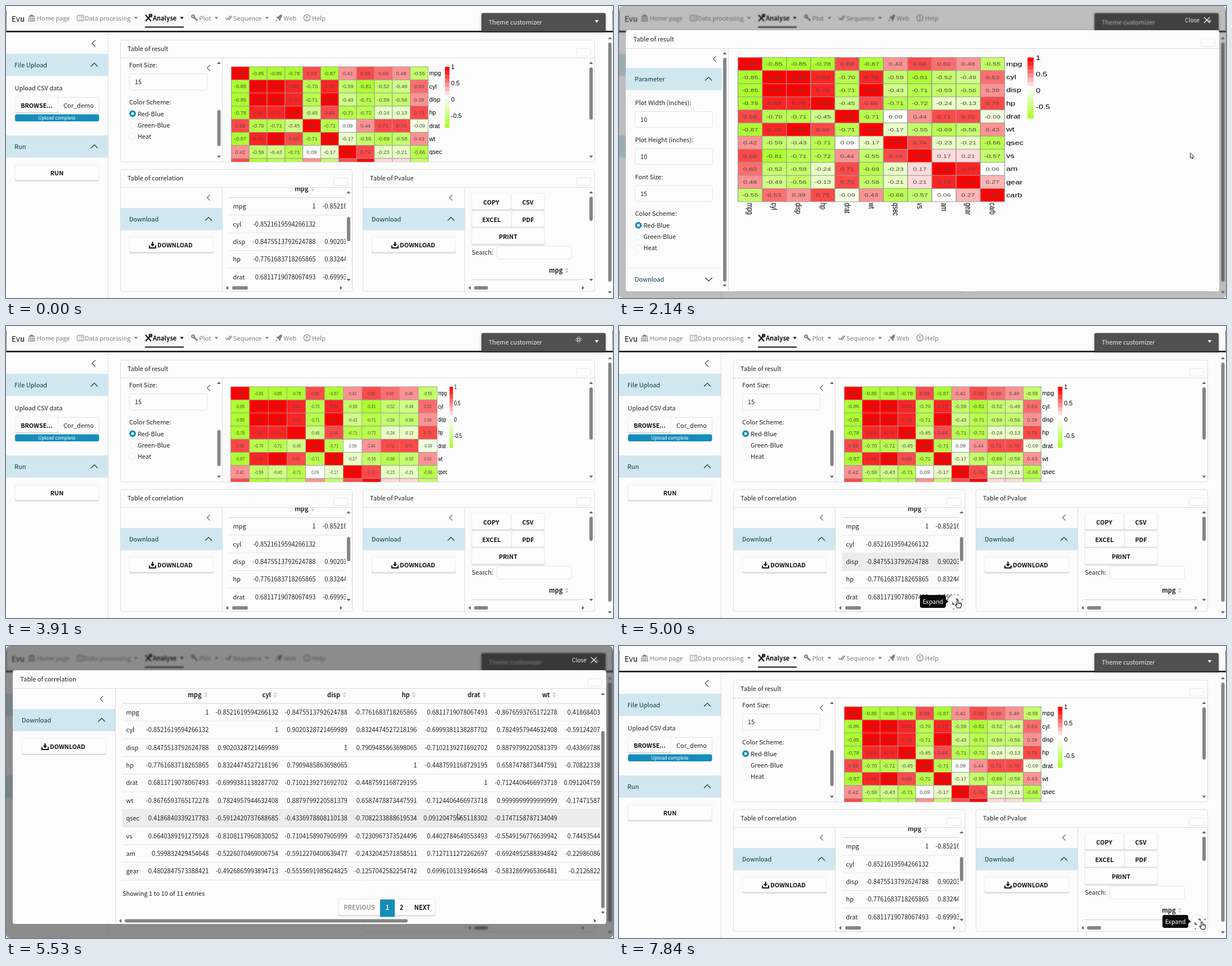
These frames come from a looping animation (1079x519 px, 7.99 s). An HTML page with a canvas:

```html
<!DOCTYPE html>
<html lang="en">
<head>
<meta charset="utf-8">
<title>Correlation dashboard</title>
<style>
html, body { margin: 0; width: 100%; height: 100%; overflow: hidden; background: #fff; }
canvas { display: block; width: 1079px; height: 519px; }
</style>
</head>
<body>
<canvas id="stage" width="1079" height="519"></canvas>
<script>
const W = 1079, H = 519, LOOP = 7990;
const canvas = document.getElementById('stage'), c = canvas.getContext('2d');
const snapshot = new OffscreenCanvas(W, H), snap = snapshot.getContext('2d');
const SANS = '"Noto Sans CJK SC", "Noto Sans CJK JP", "Noto Sans", sans-serif';
const PLOT = '"Liberation Sans", Arial, sans-serif';
const PAPER = '#fcfcfc', INK = '#222', BLUE = '#158cba', PALE = '#d0e7ef', NAVY = '#08384a', EDGE = '#dcdcdc', GREY = '#858585';

// Lower triangle of the correlation matrix, without the diagonal.
const NAMES = 'mpg cyl disp hp drat wt qsec vs am gear carb'.split(' ');
const LOWER = `
-0.8521619594266132
-0.8475513792624788 0.9020328721469989
-0.7761683718265865 0.8324474527218196 0.7909485863698065
0.6811719078067493 -0.6999381138287702 -0.7102139271692702 -0.4487591168729195
-0.8676593765172278 0.7824957944632408 0.8879799220581379 0.6587478873447591 -0.7124406466973718
0.4186840339217783 -0.5912420737688685 -0.4336978808110138 -0.7082233888619534 0.09120475965118302 -0.1747158787134049
0.6640389191275928 -0.8108117960830052 -0.7104158907905999 -0.7230967373524496 0.4402784649553493 -0.5549156776639942 0.7445354435125272
0.599832429454648 -0.5226070469006754 -0.5912270400639477 -0.2432042571858511 0.7127111272262697 -0.6924952588394842 -0.2298608621848839 0.17
0.4802847573388421 -0.4926865993894713 -0.5555691985624825 -0.1257042582254742 0.6996101319346648 -0.5832869965366481 -0.212682229720365 0.21 0.79
-0.55 0.53 0.39 0.75 -0.09 0.43 -0.66 -0.57 0.06 0.27`.split('\n').map(row => row.split(' '));
const value = (i, j) => i === j ? (i === 5 ? '0.9999999999999999' : '1') : LOWER[Math.max(i, j)][Math.min(i, j)];

function text(s, x, y, { size = 11, color = INK, bold = false, align = 'left', family = SANS } = {}) {
  c.font = `${bold ? 'bold ' : ''}${size}px ${family}`;
  c.fillStyle = color;
  c.textAlign = align;
  c.fillText(s, x, y);
}
function box(x, y, w, h, r, fill, stroke) {
  c.beginPath();
  c.roundRect(x, y, w, h, r);
  if (fill) { c.fillStyle = fill; c.fill(); }
  if (stroke) { c.strokeStyle = stroke; c.lineWidth = 1; c.stroke(); }
}
function path(points, { stroke, fill, width = 1.2, x = 0, y = 0, close = !!fill } = {}) {
  c.beginPath();
  for (let i = 0; i < points.length; i += 2) c.lineTo(x + points[i], y + points[i + 1]);
  if (close) c.closePath();
  if (fill) { c.fillStyle = fill; c.fill(); }
  if (stroke) { c.strokeStyle = stroke; c.lineWidth = width; c.stroke(); }
}
function dot(x, y, r, fill, stroke, width = 1) {
  c.beginPath();
  c.arc(x, y, r, 0, 7);
  if (fill) { c.fillStyle = fill; c.fill(); }
  if (stroke) { c.strokeStyle = stroke; c.lineWidth = width; c.stroke(); }
}
function clipped(x, y, w, h, draw) {
  c.save();
  c.beginPath();
  c.rect(x, y, w, h);
  c.clip();
  draw();
  c.restore();
}
const rule = (x1, y1, x2, y2, stroke = EDGE, width = 1) => path([x1, y1, x2, y2], { stroke, width });
const DIRECTIONS = { up: 0, right: 1, down: 2, left: 3 };
function turned(x, y, dir, draw) {
  c.save();
  c.translate(x, y);
  c.rotate(DIRECTIONS[dir] * Math.PI / 2);
  draw();
  c.restore();
}
const triangle = (x, y, dir, fill = '#666', s = 3.5) =>
  turned(x, y, dir, () => path([-s, s * .6, 0, -s * .6, s, s * .6], { fill }));
const chevron = (x, y, dir, stroke = NAVY, s = 6) =>
  turned(x, y, dir, () => path([-s, s / 2, 0, -s / 2, s, s / 2], { stroke }));

function scrollV(x, top, bottom, from, to) {
  triangle(x, top, 'up');
  triangle(x, bottom, 'down');
  box(x - 3, from, 6, to - from, 3, GREY);
}
function scrollH(y, left, right, from, to) {
  triangle(left, y, 'left');
  triangle(right, y, 'right');
  box(from, y - 3, to - from, 6, 3, GREY);
}
function button(label, x, y, w, h = 30, opts = {}) {
  box(x, y, w, h, 3, '#dadada');
  box(x + .5, y, w - 1, h - 2.5, 3, '#fdfdfd', '#efefef');
  text(label, x + w / 2, y + h / 2 + 4, { size: 10.8, bold: true, color: '#111', align: 'center', ...opts });
}
function field(label, x, y, w = 138, h = 29) {
  box(x + .5, y + .5, w, h, 4, '#fefefe', '#d9e6ec');
  text(label, x + 10, y + 19);
}
function accordion(label, x, y, w, pad = 15) {
  box(x, y, w, 39.5, 0, PALE);
  text(label, x + pad, y + 24, { color: NAVY });
  chevron(x + w - 24, y + 19.5, 'up');
}
function radios(x, y) {
  ['Red-Blue', 'Green-Blue', 'Heat'].forEach((label, i) => {
    const cy = y + i * 20.2;
    dot(x, cy, 5.5, i ? '#fefefe' : BLUE, i ? '#e6eef2' : BLUE);
    if (!i) dot(x, cy, 2.5, '#fff');
    text(label, x + 9, cy + 4.2);
  });
}
function downloadButton(x, y) {
  button('DOWNLOAD', x, y, 150, 30, { align: 'left' , color: 'transparent' });
  text('DOWNLOAD', x + 50, y + 19, { size: 10.8, bold: true, color: '#111' });
  path([36, 15.5, 36, 20, 47, 20, 47, 15.5], { x, y, stroke: '#111', width: 2 });
  path([41.5, 9, 41.5, 15], { x, y, stroke: '#111', width: 2.2 });
  path([37.8, 13, 45.2, 13, 41.5, 17.4], { x, y, fill: '#111' });
}
function sorter(x, y) {
  triangle(x, y - 3, 'up', '#d0d0d0', 3.4);
  triangle(x, y + 3, 'down', '#d0d0d0', 3.4);
}

// Fifteen bands from green-yellow through white to red.
const MIN = -0.868;
function bandColor(band) {
  const k = (band - 7) / 7;
  return k > 0 ? `rgb(255,${255 * (1 - k)},${255 * (1 - k)})` : `rgb(${255 + 82 * k},255,${255 + 208 * k})`;
}
function heatmap(x, y, wide, stretch) {
  const left = wide ? -1.4 : 0, cw = wide ? 45.2 : 31.8, ch = 23.3, end = left + 11 * cw;
  const label = { size: 10.8, color: '#000', family: PLOT };
  c.save();
  c.translate(x, y);
  c.scale(stretch, 1);
  NAMES.forEach((name, i) => {
    const cy = (i + .5) * ch + 3.3;
    NAMES.forEach((_, j) => {
      const v = +value(i, j), cx = left + j * cw;
      c.fillStyle = bandColor(Math.min(14, Math.floor((v - MIN) / (1 - MIN) * 15)));
      c.fillRect(cx, i * ch, cw, ch);
      c.strokeStyle = '#999';
      c.lineWidth = .9;
      c.strokeRect(cx, i * ch, cw, ch);
      text(v.toFixed(2), cx + cw / 2, cy, { size: 9.3, color: '#4d4d4d', align: 'center', family: PLOT });
    });
    text(name, end + 2, cy + .4, label);
    c.save();
    c.translate(left + (i + .5) * cw, 11 * ch + 2);
    c.rotate(Math.PI / 2);
    text(name, 0, 3.5, label);
    c.restore();
  });
  const bandHeight = 58 * (1 - MIN) / 15;
  for (let b = 0; b < 15; b++) {
    c.fillStyle = bandColor(14 - b);
    c.fillRect(end + 30, b * bandHeight, 8, bandHeight + .3);
  }
  [1, .5, 0, -.5].forEach(v => text(v, end + 41, (1 - v) * 58 + 4, label));
  c.restore();
}

const COLUMN_ENDS = [154, 277.5, 400.5, 524, 649.5, 773.5, 899], ROW = 31.4;
function table(x, y, right, bottom, hovered) {
  clipped(x, y - 27, right - x, bottom - y + 27, () => {
    COLUMN_ENDS.forEach((end, j) => {
      text(NAMES[j], x + end - 13, y - 11.5, { bold: true, align: 'right' });
      sorter(x + end - 5.5, y - 15.5);
    });
    for (let i = 0; i < 10; i++) {
      const top = y + i * ROW;
      if (i === hovered) box(x, top, right - x, ROW, 0, '#ececec');
      rule(x, top + ROW, right, top + ROW, '#e2e2e2');
      text(NAMES[i], x + 7, top + 19.7);
      COLUMN_ENDS.forEach((end, j) => text(value(i, j), x + end, top + 19.7, { size: 11.1, align: 'right' }));
    }
    rule(x, y, right, y, '#cfcfcf');
  });
}

const ICONS = {
  bank(x, s) {
    path([0, 19, 6.5, 15, 13, 19], { x, fill: s });
    for (let i = 0; i < 4; i++) rule(x + 2 + i * 3, 20, x + 2 + i * 3, 25, s, 1.5);
    rule(x, 26.5, x + 13, 26.5, s, 1.6);
  },
  list(x, s) {
    box(x + .5, 16.5, 12, 10, 1.5, null, s);
    [19.5, 23.5].forEach(y => { rule(x + 3, y, x + 4.5, y, s, 1.5); rule(x + 6, y, x + 11, y, s); });
  },
  tools(x, s) {
    rule(x + 1, 16, x + 11, 27, s, 2.2);
    rule(x + 11, 16, x + 1, 27, s, 2.2);
    dot(x + 10, 17, 2.5, null, s, 1.5);
  },
  wrench(x, s) {
    rule(x + 4, 19, x + 11, 26, s, 2.8);
    dot(x + 3.5, 18.5, 2.4, null, s, 2);
  },
  checks(x, s) {
    path([0, 21, 3, 24.5, 9, 17.5], { x, stroke: s, width: 1.4 });
    path([5, 23, 6.5, 24.5, 12, 17.5], { x, stroke: s, width: 1.4 });
  },
  rocket(x, s) {
    path([12, 15, 8, 16, 3, 21, 7, 25, 11, 20], { x, fill: s });
    path([5, 18, 1, 20, 3, 21], { x, fill: s });
    path([10, 22, 8, 27, 6, 25], { x, fill: s });
    rule(x, 27, x + 3, 24, s, 1.3);
  },
  info(x, s) {
    dot(x + 6, 21, 5.6, null, s, 1.2);
    rule(x + 6, 18, x + 6, 22, s, 1.5);
    rule(x + 6, 23, x + 6, 24.5, s, 1.5);
  }
};
const MENU = [['Home page', 39, 55, 'bank'], ['Data processing', 126, 140, 'list', 231], ['Analyse', 247, 261, 'tools', 312.5],
  ['Plot', 329, 343.5, 'wrench', 374], ['Sequence', 390, 404, 'checks', 464], ['Web', 479, 493.5, 'rocket'], ['Help', 529, 544, 'info']];

function navbar() {
  text('Evu', 10, 27.5, { size: 13.6, color: '#111' });
  for (const [label, iconX, x, icon, caret] of MENU) {
    const active = label === 'Analyse', color = active ? '#111' : '#808080';
    ICONS[icon](iconX, color);
    text(label, x, 25.5, { color, bold: active });
    if (caret) triangle(caret, 21.5, 'down', color, 3.3);
  }
  box(247, 36.5, 69, 2, 0, '#111');
  box(0, 44, W, 2.7, 0, '#1c1c1c');
  rule(.5, 8, .5, 45, '#777');
  rule(W - .5, 8, W - .5, 45, '#777');
  c.save();
  c.shadowColor = 'rgba(0,0,0,.25)';
  c.shadowBlur = 5;
  c.shadowOffsetY = 2;
  box(845, 12.5, 221, 32.5, 3, '#505050');
  c.restore();
  text('Theme customizer', 858, 32.5, { color: '#ececec' });
  triangle(1050, 27.5, 'down', '#fff', 3.6);
}
function sidebar() {
  rule(181.5, 47, 181.5, H);
  chevron(156, 66.5, 'left', '#555');
  accordion('File Upload', 0, 85, 181);
  text('Upload CSV data', 15.5, 150);
  box(16.5, 162.5, 149, 27.5, 3, '#fefefe', '#e2e2e2');
  button('BROWSE...', 16, 162, 77, 29);
  text('Cor_demo', 102, 181);
  box(16, 192.5, 149.5, 12.5, 3, BLUE);
  text('Upload complete', 90.5, 201.7, { size: 8.3, color: '#fff', align: 'center' });
  accordion('Run', 0, 230, 181);
  button('RUN', 15.5, 282, 150);
}

const CARDS = [
  { title: 'Table of result', x: 203.5, y: 60.5, w: 843, h: 217 },
  { title: 'Table of correlation', x: 203.5, y: 290.5, w: 412, h: 217 },
  { title: 'Table of Pvalue', x: 634.5, y: 290.5, w: 412, h: 217 }
];
function cardFrame({ title, x, y, w, h }, split) {
  box(x, y, w, h, 4, PAPER, EDGE);
  rule(x, y + 32, x + w, y + 32);
  rule(split, y + 32, split, y + h);
  text(title, x + 12.5, y + 19.5);
  box(x + w - 32.5, y + 15, 25, 13.5, 3, '#fefefe', '#dbe9f1');
}
function resultCard(wide) {
  cardFrame(CARDS[0], 384.5);
  chevron(360, 110, 'left', '#666', 5);
  text('Font Size:', 219, 108.5);
  field('15', 219, 120);
  text('Color Scheme:', 219, 175);
  radios(225, 191.3);
  scrollV(378.5, 101, 268, 185, 249);
  scrollV(1040, 101, 268, 109, 202);
  clipped(385, 93, 650, 184, () => heatmap(400.5, 108, wide, wide ? 1 / 1.355 : 1));
}
function downloadCard(card) {
  const { x } = card;
  cardFrame(card, x + 181);
  chevron(x + 156.5, 340.5, 'left', '#666', 5);
  accordion('Download', x + .5, 359, 180);
  downloadButton(x + 15.5, 410);
}
function correlationCard(hovered) {
  downloadCard(CARDS[1]);
  clipped(386, 323, 219, 165, () => table(396.5, 340.4, 604, 488, hovered));
  scrollV(609, 331, 487, 375, 418);
  scrollH(501, 393, 596, 402, 430);
}
function pvalueCard() {
  downloadCard(CARDS[2]);
  button('COPY', 827.5, 333, 70, 31);
  button('CSV', 897.5, 333, 60, 31);
  button('EXCEL', 827.5, 364, 71, 31);
  button('PDF', 898.5, 364, 59, 31);
  button('PRINT', 827.5, 394.5, 130, 31);
  text('Search:', 828, 442);
  field('', 872, 426, 133, 23);
  text('mpg', 989.5, 474, { bold: true, align: 'right' });
  sorter(996.5, 470);
  rule(828, 486.5, 1028, 486.5, '#cfcfcf');
  scrollV(1040, 331, 487, 339, 382);
  scrollH(501, 824, 1026, 832, 857);
}

function modalFrame(title, h) {
  box(12, 43, 1055, h, 4, PAPER);
  rule(12, 75.5, 1067, 75.5);
  rule(194.5, 75, 194.5, 43 + h);
  text(title, 25.5, 63);
  box(1034.5, 58.5, 25, 13.5, 3, '#fefefe', '#dbe9f1');
  chevron(170, 94, 'left', '#666', 5);
  text('Close', 1006, 29, { size: 10.2, color: '#f2f2f2' });
  path([1040, 20, 1050, 30], { stroke: '#f2f2f2', width: 1.3 });
  path([1050, 20, 1040, 30], { stroke: '#f2f2f2', width: 1.3 });
}
function resultModal(wide) {
  modalFrame('Table of result', 464);
  accordion('Parameter', 12, 110, 171, 16);
  [['Plot Width (inches):', '10'], ['Plot Height (inches):', '10'], ['Font Size:', '15']].forEach(([label, v], i) => {
    text(label, 28.5, 176 + i * 65.8);
    field(v, 28, 187 + i * 65.8, 138, 28);
  });
  text('Color Scheme:', 28.5, 373);
  radios(34.5, 389.7);
  rule(12, 465.5, 183, 465.5, '#e4e4e4');
  text('Download', 28, 490, { color: NAVY });
  chevron(159.5, 486, 'down');
  scrollV(188, 84, 497, 92, 490);
  heatmap(211.5, 91.5, wide, wide ? 1 : 1.355);
}
function correlationModal(mouse) {
  modalFrame('Table of correlation', 451);
  accordion('Download', 12, 112, 182, 16);
  downloadButton(28, 164);
  const row = mouse.x > 206 && mouse.x < 1056 ? Math.floor((mouse.y - 102) / ROW) : -1;
  table(206.5, 102, 1056, 480, row);
  text('Showing 1 to 10 of 11 entries', 207, 444);
  button('', 590.5, 449.5, 173, 31);
  box(665, 450.5, 26, 31, 0, BLUE);
  const page = (s, x, color) => text(s, x, 468.5, { bold: true, align: 'center', color });
  page('PREVIOUS', 628, '#999');
  page('1', 678, '#fff');
  page('2', 703, '#111');
  page('NEXT', 740, '#111');
  scrollV(1061, 85, 474, 151, 466);
  scrollH(488.5, 203, 1047, 211, 714);
}

// Pointer path: time, x, y and the shape used from then on.
const POINTER = [
  [500, 718, 11, 'arrow'], [700, 752, 60, 'arrow'], [900, 890, 160, 'arrow'], [1150, 1015, 253, 'hand'], [1240, 1023, 260, 'hand'],
  [1520, 1024, 261, 'hand'], [1800, 1024, 261, 'hand'], [1810, 1028, 262, 'hand'], [1950, 1028, 262, 'arrow'], [2380, 1000, 260, 'arrow'],
  [2690, 890, 226, 'arrow'], [2800, 884, 215, 'arrow'], [3100, 980, 90, 'arrow'], [3290, 1040, 22, 'hand'], [3400, 1018, 23, 'hand'],
  [3910, 1018, 24, 'move'], [3990, 1005, 48, 'arrow'], [4150, 930, 150, 'arrow'], [4400, 700, 400, 'arrow'], [4600, 600, 484, 'hand'],
  [4850, 602, 487, 'hand'], [5190, 602, 488, 'arrow'], [5530, 800, 300, 'arrow'], [5650, 1085, 75, 'arrow'], [5860, 1082, 50, 'arrow'],
  [6100, 1060, 35, 'arrow'], [6250, 1014, 23, 'hand'], [6480, 1022, 26, 'hand'], [6850, 1022, 25, 'arrow'], [7100, 1035, 150, 'arrow'],
  [7400, 1040, 400, 'arrow'], [7590, 1034, 487, 'hand'], [7840, 1036, 490, 'hand'], [LOOP, 1036, 490, 'hand']
];
function pointerAt(t) {
  const i = POINTER.findIndex(p => p[0] > t);
  if (i < 1) return { x: -99, y: -99, shape: 'arrow' };
  const [t0, x0, y0, shape] = POINTER[i - 1], [t1, x1, y1] = POINTER[i], k = (t - t0) / (t1 - t0);
  return { x: x0 + (x1 - x0) * k, y: y0 + (y1 - y0) * k, shape };
}
function drawPointer({ x, y, shape }) {
  c.lineJoin = 'round';
  if (shape === 'arrow') {
    path([0, 0, 0, 9.5, 2.2, 7.5, 3.8, 10.6, 5.2, 9.9, 3.7, 6.9, 6.7, 6.7], { x, y, fill: '#fff', stroke: '#223', width: 1 });
  } else if (shape === 'hand') {
    path([-1.2, .5, .2, 0, 1.2, .8, 1.3, 4.5, 5.5, 5.2, 6.6, 6.5, 6.4, 10, 5, 13.5, -.6, 13.5, -3.6, 9, -3.2, 7.4, -1.2, 8.6],
      { x, y, fill: '#fff', stroke: '#111', width: 1.1 });
    for (const dx of [1.3, 3, 4.7]) rule(x + dx, y + 5, x + dx, y + 7.5, '#111', .7);
  } else {
    for (const [color, width] of [['#fff', 3], ['#223', 1]]) {
      rule(x - 5, y, x + 5, y, color, width);
      rule(x, y - 5, x, y + 5, color, width);
      for (const [dir, dx, dy] of [['up', 0, -5], ['right', 5, 0], ['down', 0, 5], ['left', -5, 0]])
        triangle(x + dx, y + dy, dir, color, width === 3 ? 3 : 2);
    }
  }
}
function expandButton({ x, y, w, h }, tipAlpha) {
  const cx = x + w - 18, cy = y + h - 17.5;
  dot(cx, cy, 12.3, '#fefefe', '#e0e0e0');
  path([1, -4.5, 4.5, -4.5, 4.5, -1], { x: cx, y: cy, stroke: '#333', width: 1.5 });
  path([-4.5, 1, -4.5, 4.5, -1, 4.5], { x: cx, y: cy, stroke: '#333', width: 1.5 });
  c.globalAlpha = tipAlpha;
  box(cx - 62.5, cy - 12, 46, 23, 4, '#0c0c0c');
  path([-16.5, -4.5, -12, -.5, -16.5, 3.5], { x: cx, y: cy, fill: '#0c0c0c' });
  text('Expand', cx - 39.5, cy + 3.5, { align: 'center', color: '#fff', size: 10.6 });
  c.globalAlpha = 1;
}

const TIPS = [[1170, 1950, 240], [4640, 5190, 210], [7580, LOOP, 120]];
const MODALS = [{ from: 1950, to: 3910, card: 0 }, { from: 5190, to: 6850, card: 1 }];

function draw(t) {
  const mouse = pointerAt(t);
  const modal = MODALS.find(m => t >= m.from && t < m.to);
  const wide = t >= 2600 && t < 4450;
  c.clearRect(0, 0, W, H);
  c.save();
  c.beginPath();
  c.roundRect(0, 0, W, H, 7);
  c.clip();
  box(0, 0, W, H, 0, PAPER);
  navbar();
  sidebar();
  resultCard(wide);
  if (modal?.card !== 1) correlationCard(t > 4470 && t < 5190 ? 2 : -1);
  pvalueCard();
  scrollV(1073.5, 57, 509, 65, 490);

  if (modal) {
    const shade = Math.min(1, (t - modal.from) / 400);
    snap.clearRect(0, 0, W, H);
    snap.drawImage(canvas, 0, 0);
    c.globalAlpha = shade;
    c.filter = 'blur(1.5px)';
    c.drawImage(snapshot, 0, 0);
    c.filter = 'none';
    box(0, 0, W, H, 0, 'rgba(34,34,34,.6)');
    c.globalAlpha = 1;
    modal.card ? correlationModal(mouse) : resultModal(wide);
  } else {
    const card = CARDS.find(k => mouse.x > k.x && mouse.x < k.x + k.w && mouse.y > k.y && mouse.y < k.y + k.h);
    const tip = TIPS.find(([from, to]) => t >= from && t < to);
    if (card) expandButton(card, tip ? Math.min(1, (t - tip[0]) / tip[2]) : 0);
  }
  drawPointer(mouse);
  c.restore();
}
function tick() {
  draw(performance.now() % LOOP);
  requestAnimationFrame(tick);
}
tick();
</script>
</body>
</html>
```
